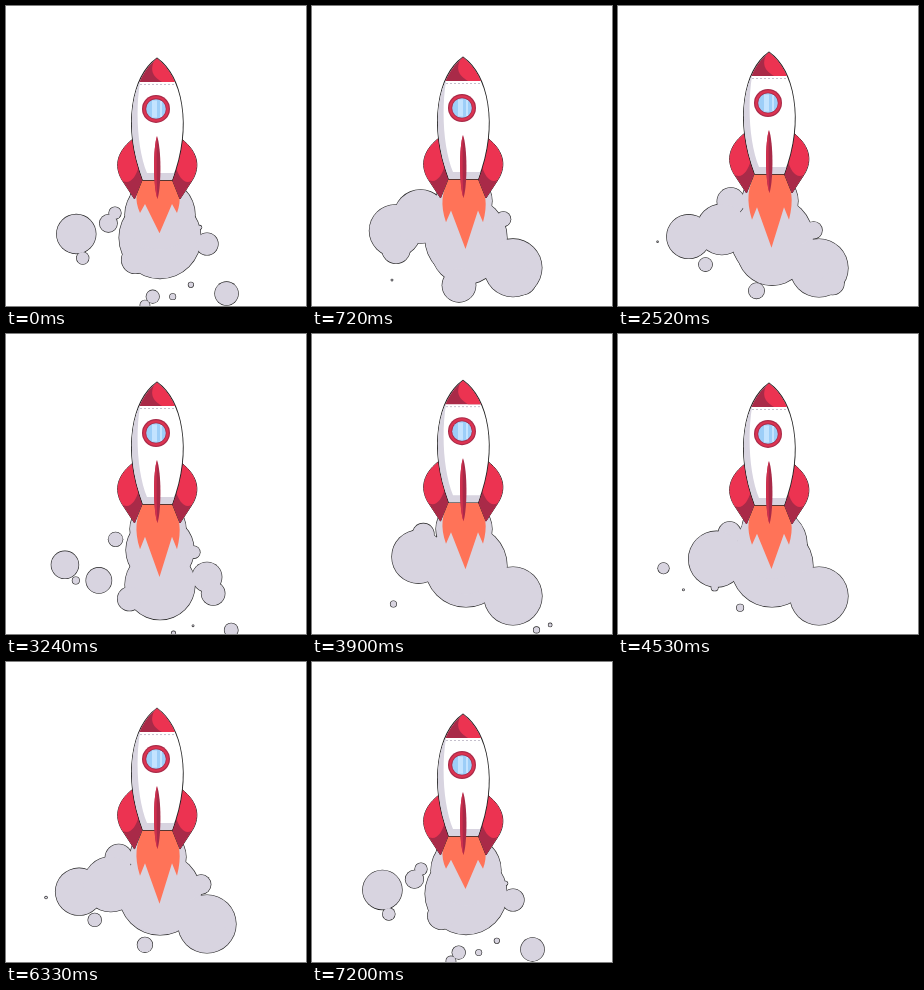
Write an HTML page with a canvas that moves like this. It is 300 px wide and 300 px high and loops after 7230 ms.

```html
<!DOCTYPE html>
<html lang="en">
<head>
<meta charset="utf-8">
<title>Rocket</title>
<style>
html, body { margin: 0; width: 100%; height: 100%; overflow: hidden; background: #fff; }
canvas { display: block; width: 300px; height: 300px; }
</style>
</head>
<body>
<canvas id="stage" width="300" height="300"></canvas>
<script>
const ctx = document.getElementById('stage').getContext('2d');
const LOOP = 7230, TAU = Math.PI * 2;
const C = { smoke: '#d8d4e0', red: '#ec3351', dark: '#a92a48', flame: '#ff7358',
            glass: '#9dcef8', shine: '#c3e3ff', line: '#222' };

// Time in ms -> number of thrust cycles done.
const pace = [[0, 0], [720, .88], [1770, 1.72], [3240, 3.12], [4530, 4.3],
              [5490, 5.42], [6780, 6.95], [7200, 7]];

// Cycle phase -> rocket height, flame length.
const thrust = [[0, 0, 53], [.12, -4, 73], [.3, -3, 64], [.42, -6, 74],
                [.72, -6, 67], [.88, -1, 70], [1, 0, 53]];

// Puffs: birth phase, lifetime, x, y, radius, outward drift.
const left = [
  [.22, .5, 83, 226, 30, .55], [.6, .86, 90, 223, 29, .82],
  [.32, .36, 105, 222, 28, .2], [.8, .28, 109, 210, 28, .2],
  [.02, .26, 94, 243, 16], [.3, .66, 85, 260, 7],
  [.76, .36, 86, 241, 16, .2], [.98, .4, 71, 244, 4]
];
const right = [
  [.34, .5, 220, 282, 12], [.78, .55, 217, 281, 15, .2],
  [.35, .24, 195, 222, 10], [.8, .26, 191, 212, 8],
  [.04, .2, 187, 215, 8], [.06, .22, 207, 259, 12]
];
const low = [
  [.94, .46, 124, 261, 15], [.34, .44, 138, 287, 8], [.8, .3, 147, 279, 17],
  [.92, .28, 139, 298, 5], [.92, .42, 167, 292, 3],
  [.94, .25, 185, 279, 2.5], [.6, .36, 237, 288, 2]
];
const puffs = [...left, ...right, ...low];

const mix = (a, b, k) => a + (b - a) * k;
const clamp = k => Math.min(1, Math.max(0, k));

function at(keys, p) {
  let i = 1;
  while (i < keys.length - 1 && p > keys[i][0]) i++;
  const a = keys[i - 1], b = keys[i];
  const k = clamp((p - a[0]) / (b[0] - a[0]));
  return a.slice(1).map((v, n) => mix(v, b[n + 1], k));
}

// A puff swells out of the plume, then drifts outward, sags and shrinks.
function puffAt([born, life, x, y, r, drift = .08], p) {
  const age = ((p - born + 2) % 1) / life, peak = .26;
  if (age >= 1) return null;
  const dx = x - 152, dy = y - 222;
  if (age < peak) {
    const u = age / peak, pull = Math.min(.6, r / 40) * (1 - u);
    return [x - dx * pull, y - dy * pull, r * u ** .15];
  }
  const k = (1 - age) / (1 - peak), gone = 1 - k ** 1.5;
  return [x + dx * drift * gone, y + (dy * drift + 12) * gone, r * k ** 1.2];
}

// The plume and the big lobes that never vanish.
function plumeAt(p) {
  const wave = Math.cos(TAU * p);
  const thin = Math.exp(-(((p - .12) / .06) ** 2));
  const gap = Math.abs(((p - .04 + 1.5) % 1) - .5);
  const swell = clamp((gap - .06) / .1);
  return [
    [152, 195, 28],
    [154, 232 - 16 * thin, 41 - 7 * thin],
    [154, 232 - 24 * Math.cos(3 * TAU * (p + .01)), 35],
    [111 - 2 * wave, 201 + 6 * wave, 10 - 4 * wave],
    [201, 238 + 24 * swell, 11 + 18 * swell]
  ];
}

function fill(d, color) {
  ctx.fillStyle = color;
  ctx.fill(new Path2D(d));
}

function rim(d, width = 1) {
  ctx.strokeStyle = C.line;
  ctx.lineWidth = width;
  ctx.stroke(new Path2D(d));
}

function disc(x, y, r, color) {
  ctx.beginPath();
  ctx.arc(x, y, r, 0, TAU);
  ctx.fillStyle = color;
  ctx.fill();
}

function drawSmoke(p) {
  const all = plumeAt(p);
  for (const puff of puffs) {
    const spot = puffAt(puff, p);
    if (spot && spot[2] > .3) all.push(spot);
  }
  for (const [x, y, r] of all) disc(x, y, r + .6, C.line);
  for (const [x, y, r] of all) disc(x, y, r, C.smoke);
}

function drawFlame(len) {
  const y = k => 174 + len * k;
  fill(`M137 173 C130 ${y(.18)} 128 ${y(.36)} 134 ${y(.62)} L139 ${y(.45)}
        L153.5 ${y(1)} L166 ${y(.45)} L171 ${y(.62)}
        C176 ${y(.36)} 174 ${y(.18)} 166 173 Z`, C.flame);
}

const BODY = 'M151 52.5 C127 70 116 118 137 174 H166 C187 118 175 70 151 52.5 Z';
const FIN = 'M127 133 C109 147 108 163 118 177 L128.5 193 L136.5 173 Z';
const FIN_SHADE = 'M117 175 C124 179 130 171 133 160 L136.5 173 L128.5 193 Z';

function drawFin(flip) {
  ctx.save();
  if (flip) {
    ctx.translate(302.5, 0);
    ctx.scale(-1, 1);
  }
  rim(FIN);
  fill(FIN, C.red);
  fill(FIN_SHADE, C.dark);
  ctx.restore();
}

function drawBody() {
  rim(BODY, 1.6);
  fill(BODY, '#fff');
  ctx.save();
  ctx.clip(new Path2D(BODY));
  fill('M120 76 H134 C129 108 132 145 141 167 H170 V176 H120 Z', C.smoke);
  fill('M120 50 H180 V76 H120 Z', C.dark);
  fill('M151 50 C143 62 145 70 156 76 H180 V50 Z', C.red);
  ctx.restore();
  ctx.setLineDash([2, 2]);
  ctx.strokeStyle = '#c4bfcc';
  ctx.lineWidth = 1;
  ctx.stroke(new Path2D('M134 78.5 H169'));
  ctx.setLineDash([]);
}

function drawWindow() {
  disc(150, 103, 14, C.dark);
  disc(150, 103, 12.8, '#dc3452');
  disc(150, 103, 10.6, C.dark);
  disc(150, 103, 9.8, C.glass);
  fill('M146 94.5 H151 V111.5 H146 Z M154 95 H156 V111 H154 Z', C.shine);
}

function draw(time) {
  const p = at(pace, time % LOOP)[0] % 1;
  const [lift, len] = at(thrust, p);
  ctx.fillStyle = '#fff';
  ctx.fillRect(0, 0, 300, 300);
  drawSmoke(p);
  ctx.save();
  ctx.translate(0, lift);
  drawFlame(len);
  drawFin(false);
  drawFin(true);
  drawBody();
  drawWindow();
  fill('M151 130 C147 142 147 180 151.5 193 C155.5 180 155.5 142 151 130 Z', C.dark);
  fill('M151 130 C147 142 147 180 151.5 193 C150.5 176 150.5 148 151 130 Z', '#cf304e');
  ctx.restore();
}

function tick() {
  draw(performance.now());
  requestAnimationFrame(tick);
}
tick();
</script>
</body>
</html>
```
